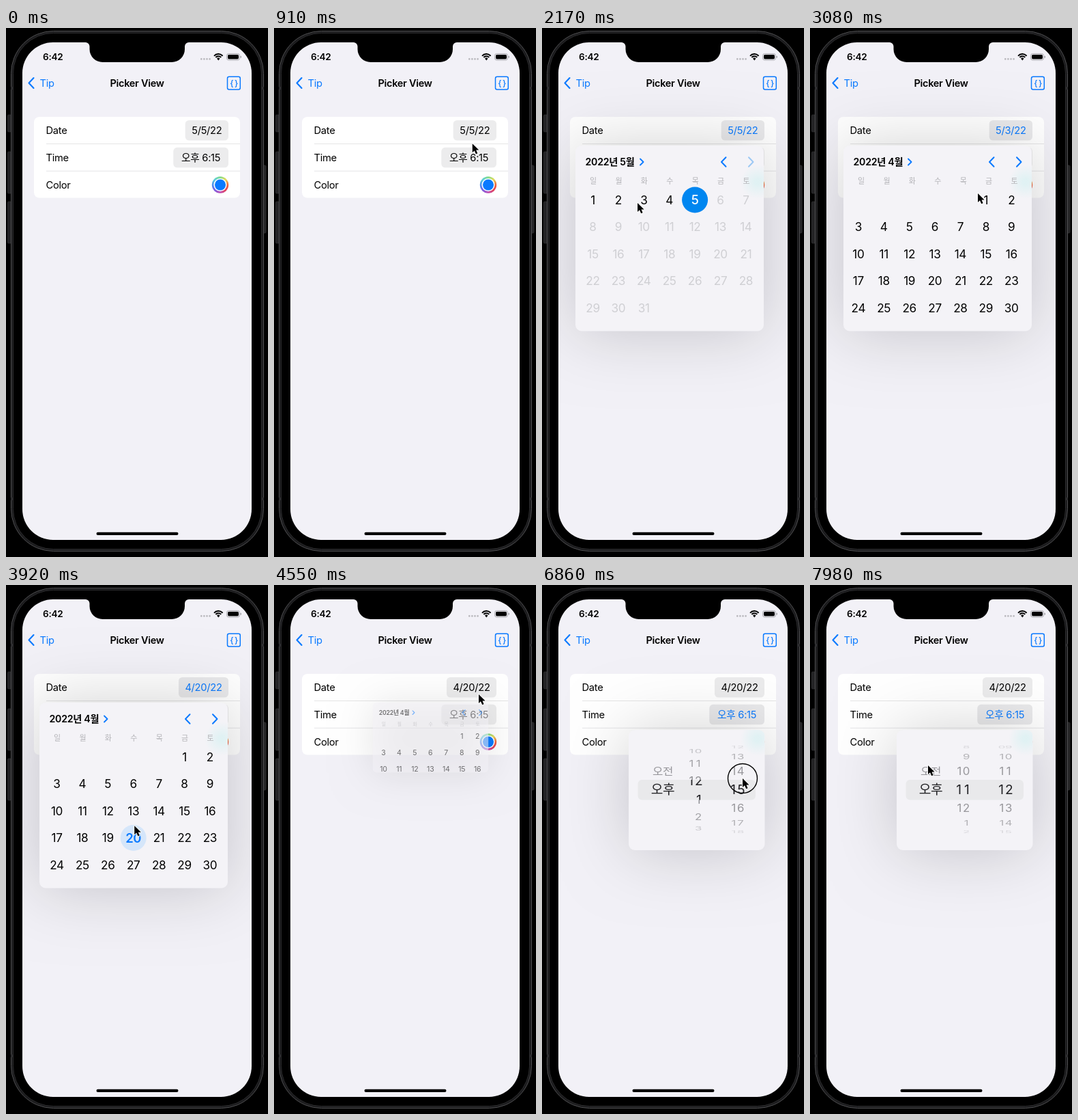
Recreate the animation shown at these times as an HTML page with a canvas. Size 384x774 px, loop 8 s.

```html
<!DOCTYPE html>
<html lang="ko">
<head>
<meta charset="utf-8">
<title>Picker View</title>
<style>
html, body { margin: 0; width: 100%; height: 100%; overflow: hidden; background: #000; }
canvas { display: block; width: 384px; height: 774px; }
</style>
</head>
<body>
<canvas id="stage"></canvas>
<script>
const W = 384, H = 774, LOOP = 8000;
const BLUE = '#0a7aff', BG = '#f2f1f7', PANEL = '#f4f3f7';
const FONT = 'Inter, "Noto Sans CJK KR", "Noto Sans CJK", sans-serif';
const cv = document.getElementById('stage');
const dpr = window.devicePixelRatio || 1;
cv.width = W * dpr;
cv.height = H * dpr;
const c = cv.getContext('2d');

const clamp = p => Math.max(0, Math.min(1, p));
const span = (t, a, d) => clamp((t - a) / d);
const smooth = p => p * p * (3 - 2 * p);
const within = (t, a, b) => t >= a && t < b;

// [time, x, y, linear]
const PATH = [
  [280, 376, 470], [1000, 287, 156], [1180, 286, 158], [1400, 282, 175],
  [1540, 268, 190], [1960, 140, 256], [2400, 140, 256], [2640, 267, 198],
  [2800, 267, 198], [3080, 246, 242], [3340, 242, 262], [3620, 180, 367],
  [3860, 180, 367], [4240, 299, 155], [4400, 299, 157], [4550, 300, 160],
  [4840, 288, 191], [5080, 286, 193], [5500, 253, 281], [5900, 253, 281],
  [6080, 250, 281], [6500, 250, 362, 1], [6700, 294, 283], [6870, 294, 283],
  [7480, 300, 377.5], [7620, 300, 377.5], [7960, 173, 264]
];
const PRESSES = [
  [1040, 1170], [2000, 2160], [2660, 2780], [3660, 3800], [4270, 4390],
  [4890, 5020], [5960, 6500], [6720, 7600]
];

function pointer(t) {
  let i = 0;
  while (i < PATH.length - 1 && PATH[i + 1][0] <= t) i++;
  const a = PATH[i], b = PATH[i + 1] || a;
  let p = b === a ? 0 : span(t, a[0], b[0] - a[0]);
  if (!b[3]) p = smooth(p);
  return { x: a[1] + (b[1] - a[1]) * p, y: a[2] + (b[2] - a[2]) * p };
}

function box(x, y, w, h, r, fill, stroke, lw = 1) {
  c.beginPath();
  c.roundRect(x, y, w, h, r);
  if (fill) { c.fillStyle = fill; c.fill(); }
  if (stroke) { c.strokeStyle = stroke; c.lineWidth = lw; c.stroke(); }
}

function line(points, color, lw) {
  c.beginPath();
  points.forEach(([x, y]) => c.lineTo(x, y));
  c.strokeStyle = color;
  c.lineWidth = lw;
  c.lineCap = c.lineJoin = 'round';
  c.stroke();
}

function disc(x, y, r, color) {
  c.beginPath();
  c.arc(x, y, r, 0, 7);
  c.fillStyle = color;
  c.fill();
}

// y is the middle of the capitals
function text(s, x, y, size, color = '#000', weight = 400, align = 'left') {
  c.font = `${weight} ${size}px ${FONT}`;
  c.letterSpacing = -size * 0.02 + 'px';
  c.textAlign = align;
  c.fillStyle = color;
  c.fillText(s, x, y + size * 0.364);
}

// digits in equal cells, ending at x
function digits(s, x, y, size, color) {
  const cell = size * 0.605;
  [...s].forEach((d, i) => text(d, x - cell * (s.length - i - 0.5), y, size, color, 400, 'center'));
}

function chevron(x, y, w, h, color, lw) {
  line([[x, y - h / 2], [x + w, y], [x, y + h / 2]], color, lw);
}

function phone() {
  c.fillStyle = '#000';
  c.fillRect(0, 0, W, H);
  for (const [y, h] of [[127, 25], [181, 61], [254, 61]]) box(2.5, y, 5, h, 1.5, '#242426', '#343436', 0.7);
  box(376.5, 201, 4.5, 99, 1.5, '#242426', '#343436', 0.7);
  box(7.5, 4.5, 370, 761, 62, '#1b1b1d', '#4f4f51');
  box(10.5, 7.5, 364, 755, 59, '#000', '#2c2c2e');
  c.fillStyle = '#2c2c2e';
  for (const y of [86, 687]) {
    c.fillRect(7, y, 4, 4);
    c.fillRect(374, y, 4, 4);
  }
  box(24, 21, 336, 728, 45, BG);
}

function notch() {
  c.beginPath();
  c.moveTo(116, 20);
  c.lineTo(116, 21);
  c.arcTo(122.5, 21, 122.5, 30, 6);
  c.arcTo(122.5, 50, 150, 50, 19);
  c.arcTo(262, 50, 262, 30, 19);
  c.arcTo(262, 21, 268.5, 21, 6);
  c.lineTo(268.5, 20);
  c.fillStyle = '#000';
  c.fill();
}

function statusBar() {
  text('6:42', 54, 42.5, 13.6, '#000', 600);
  for (let i = 0; i < 4; i++) disc(286.3 + i * 4.1, 45.4, 1.3, '#b9b8bd');
  c.strokeStyle = '#000';
  c.lineCap = 'butt';
  c.lineWidth = 2;
  for (const r of [8.6, 5.4]) {
    c.beginPath();
    c.arc(311.3, 46.7, r, -Math.PI * 0.76, -Math.PI * 0.24);
    c.stroke();
  }
  c.beginPath();
  c.moveTo(311.3, 47.4);
  c.arc(311.3, 46.7, 3, -Math.PI * 0.76, -Math.PI * 0.24);
  c.fillStyle = '#000';
  c.fill();
  box(323.5, 37.5, 19, 9.5, 3, null, '#a2a1a6', 0.9);
  box(325, 39, 16, 6.5, 1.7, '#000');
  box(343.6, 40.8, 1.3, 3, 0.7, '#a2a1a6');
}

function navBar() {
  chevron(40.5, 80.5, -7, 15, BLUE, 2.1);
  text('Tip', 49.5, 80.5, 14.7, BLUE);
  text('Picker View', 192, 80.5, 14.5, '#000', 600, 'center');
  box(324.5, 71.3, 18.8, 18.8, 2.5, null, BLUE, 1.5);
  text('{', 330.8, 80.2, 12, BLUE, 500, 'center');
  text('}', 337.4, 80.2, 12, BLUE, 500, 'center');
}

function button(x, y, w, label, active) {
  box(x, y, w, 29.5, 5.5, active ? '#e9e9eb' : '#ececed');
  text(label, x + w / 2, y + 15, 14.7, active ? BLUE : '#000', 400, 'center');
}

function colorWell() {
  const g = c.createConicGradient(0, 314, 229.5);
  ['#f0663c', '#e0425a', '#c04fb5', '#7a5fe0', '#4a90f0', '#5fd0d8', '#7fdc8a', '#e4dc5c', '#f0663c']
    .forEach((k, i) => g.addColorStop(i / 8, k));
  disc(314, 229.5, 12.2, g);
  disc(314, 229.5, 9.6, '#fff');
  disc(314, 229.5, 8, BLUE);
}

function list(t) {
  box(41, 130, 302, 118.5, 8, '#fff');
  c.fillStyle = '#e2e2e4';
  c.fillRect(59, 169, 284, 0.9);
  c.fillRect(59, 208.8, 284, 0.9);
  ['Date', 'Time', 'Color'].forEach((s, i) => text(s, 58.5, 150 + i * 39.6, 14.7));
  const long = t >= 3830;
  const date = long ? '4/20/22' : t >= 2200 ? '5/3/22' : '5/5/22';
  const x = long ? 253 : 262.7;
  button(x, 135, 326 - x, date, within(t, 1210, 4430));
  button(245.3, 174.8, 80.7, '오후 6:15', t >= 5080);
  colorWell();
}

// scale of a popover over its life
function grow(t, open, close) {
  if (t < open || t > close + 200) return 0;
  const p = t < close ? 1 - span(t, open, 350) : 0;
  const q = span(t, close, 200);
  return 1 - 0.9 * (p * p * p + q * q);
}

function popover(s, ax, x, y, w, h, body) {
  const alpha = clamp(1 - 1.2 * (1 - s));
  if (alpha <= 0) return;
  c.save();
  c.translate(ax, y);
  c.scale(s, s);
  c.translate(-ax, -y);
  c.globalAlpha = alpha;
  c.save();
  c.shadowColor = 'rgba(0,0,0,.19)';
  c.shadowBlur = 94 * s * dpr;
  c.shadowOffsetY = 2 * s * dpr;
  box(x, y, w, h * s, 9, PANEL);
  c.restore();
  c.beginPath();
  c.roundRect(x, y, w, h * s, 9);
  c.clip();
  if (s > 0.9) {
    const g = c.createRadialGradient(316, 225, 4, 316, 225, 25);
    g.addColorStop(0, 'rgba(205,240,240,.5)');
    g.addColorStop(1, 'rgba(205,240,240,0)');
    c.fillStyle = g;
    c.fillRect(x, y, w, h);
  }
  body();
  c.restore();
}

function month(dx, first, count, last, today, picked) {
  for (let d = 1; d <= count; d++) {
    const n = d + first - 1;
    const x = 74.5 + dx + (n % 7) * 37.4, y = 251.5 + Math.floor(n / 7) * 39.5;
    const isToday = d === today;
    let color = d > last ? '#cfcfd3' : isToday ? BLUE : '#000', weight = 400;
    if (d === picked) {
      disc(x, y, 19, isToday ? '#0086f0' : '#d5e6fa');
      color = isToday ? '#fff' : BLUE;
      weight = isToday ? 500 : 600;
    }
    text(String(d), x, y, d === picked ? 18.5 : 17.2, color, weight, 'center');
  }
}

function calendar(t) {
  const april = t >= 2740;
  text(april ? '2022년 4월' : '2022년 5월', 63.5, 196, 14.2, '#000', 600);
  chevron(144, 196, 4.6, 9, BLUE, 1.8);
  chevron(269.5, 196, -6.5, 13.5, BLUE, 2);
  chevron(303, 196, 6.5, 13.5, april ? BLUE : '#9cc8f4', 2);
  [...'일월화수목금토'].forEach((s, i) => text(s, 75 + i * 37.4, 224, 11, '#b4b4b8', 400, 'center'));
  const slide = 276 * (1 - Math.pow(1 - span(t, 2730, 460), 3));
  c.save();
  c.beginPath();
  c.rect(49, 231, 276, 212);
  c.clip();
  if (slide < 276) month(slide, 0, 31, 5, 5, t >= 2200 ? 3 : 5);
  if (slide > 0) month(slide - 276, 5, 30, 30, 0, t >= 3830 ? 20 : 0);
  c.restore();
}

function wheel(value, big, label, paint) {
  const mid = Math.round(value);
  for (let i = mid - 4; i <= mid + 4; i++) {
    const s = label(i), a = (i - value) * 0.434, k = Math.cos(a);
    if (!s || Math.abs(a) > 1.45) continue;
    c.save();
    c.translate(0, 299.5 + 64 * Math.sin(a));
    c.scale(1, k);
    paint(s, big ? 19.2 : 16.8, big ? '#232326' : `rgba(40,40,45,${0.5 * k})`);
    c.restore();
  }
}

function timePicker(t) {
  const y = pointer(t).y;
  let hour = 6, minute = 15;
  if (within(t, 6080, 6500)) hour = 6 - (y - 281) / 27;
  else if (t >= 6500) hour = -1 + 4 * Math.pow(1 - span(t, 6500, 920), 2);
  if (within(t, 6870, 7600)) minute = 15 - (y - 283) / 27;
  else if (t >= 7600) minute = 12 - 0.5 * (1 - smooth(span(t, 7600, 280)));

  box(140.5, 285, 172.5, 29.5, 6, '#e9e9eb');
  for (const big of [false, true]) {
    const pad = big ? 1.5 : 0;
    c.save();
    c.beginPath();
    if (big) c.rect(127, 285, 199, 29.5);
    else {
      c.rect(127, 212, 199, 73);
      c.rect(127, 314.5, 199, 74);
    }
    c.clip();
    wheel(1, big, i => ['오전', '오후'][i],
      (s, size, color) => text(s, 177, 0, size, color, 400, 'center'));
    wheel(hour, big, i => String(((i - 1) % 12 + 12) % 12 + 1),
      (s, size, color) => digits(s, 234 + pad, 0, size, color));
    wheel(minute, big, i => String((i + 60) % 60).padStart(2, '0'),
      (s, size, color) => digits(s, 296 + pad, 0, size, color));
    c.restore();
  }
}

function cursor(t) {
  if (t < 280) return;
  const { x, y } = pointer(t);
  if (PRESSES.some(([a, b]) => within(t, a, b))) {
    c.beginPath();
    c.arc(x, y, 21.5, 0, 7);
    c.strokeStyle = '#000';
    c.lineWidth = 1.4;
    c.stroke();
  }
  c.save();
  c.translate(x, y);
  c.beginPath();
  [[0, 0], [0, 13], [3, 10.2], [5.2, 15.2], [7.6, 14.2], [5.5, 9.4], [9.6, 9.4]].forEach(([a, b]) => c.lineTo(a, b));
  c.closePath();
  c.lineJoin = 'round';
  c.strokeStyle = '#fff';
  c.lineWidth = 1.8;
  c.stroke();
  c.fillStyle = '#000';
  c.fill();
  c.restore();
}

function draw(t) {
  c.setTransform(dpr, 0, 0, dpr, 0, 0);
  phone();
  c.save();
  c.beginPath();
  c.roundRect(24, 21, 336, 728, 45);
  c.clip();
  statusBar();
  navBar();
  list(t);
  popover(grow(t, 1202, 4420), 297, 49, 172, 276, 271.5, () => calendar(t));
  popover(grow(t, 5080, 9000), 286, 127, 212, 199.5, 176, () => timePicker(t));
  box(132.5, 737.8, 120, 4.3, 2.1, '#000');
  c.restore();
  notch();
  cursor(t);
}

const start = performance.now();
function tick() {
  draw((performance.now() - start) % LOOP);
  requestAnimationFrame(tick);
}
tick();
</script>
</body>
</html>
```
